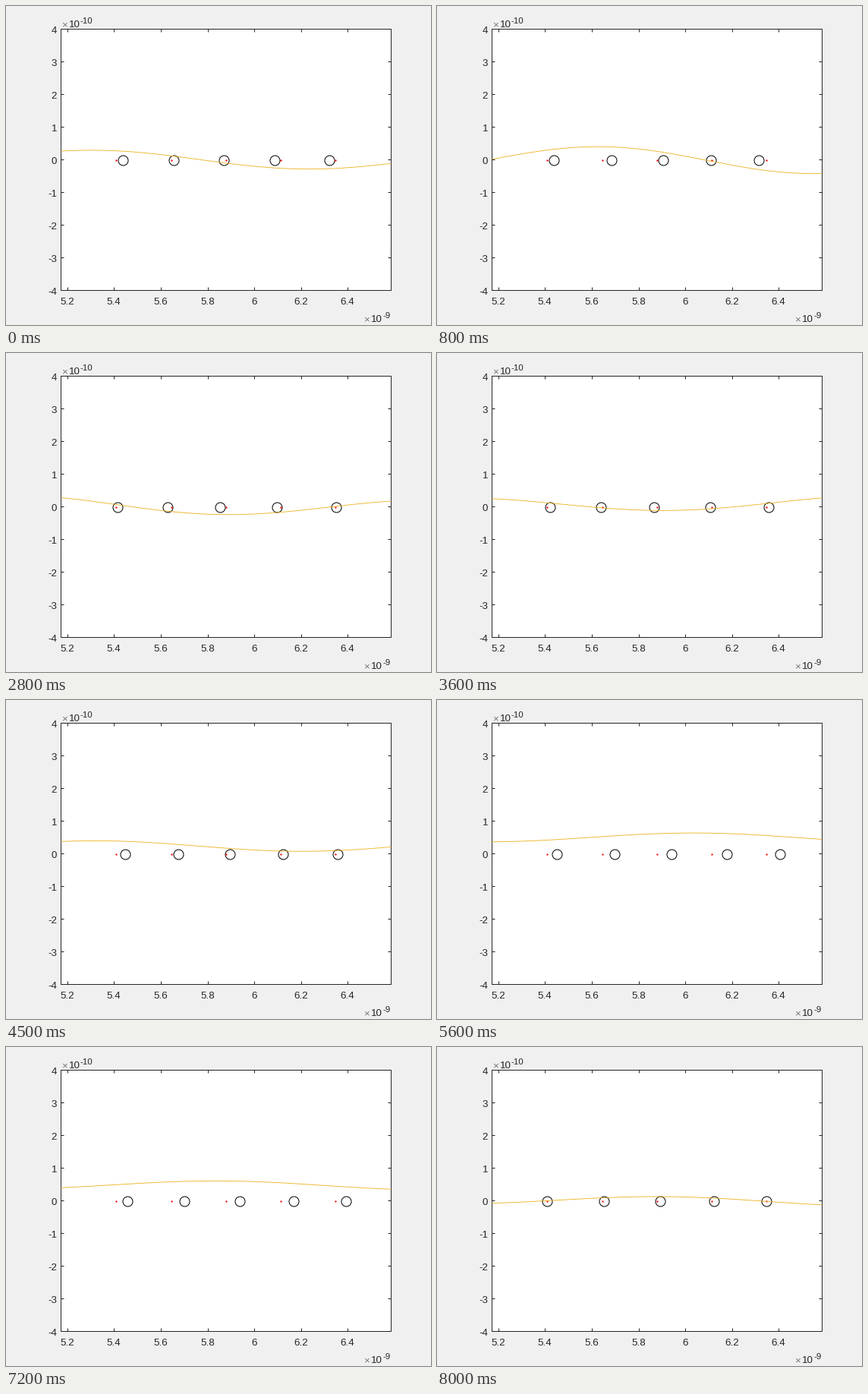
A matplotlib script for the animation above (8.1 s loop, 560 px wide and 420 px high).

```python
import numpy as np
import matplotlib.pyplot as plt
from matplotlib.animation import FuncAnimation
from matplotlib.patches import Rectangle

WIDTH, HEIGHT, DPI = 560, 420, 100
FRAMES, INTERVAL = 81, 100
PX = 72 / DPI  # points per pixel
LEFT, RIGHT, TOP, BOTTOM = 72, 507, 30, 374
MIDDLE, UNIT_Y = 202, 43
ZERO_Y = MIDDLE + 0.5  # centre of the pixel row
TICK = 4.4
INK = "#262626"
CENTRE, SPACING = 289.8, 72.3
SHIFT = 0.7155  # horizontal pixels per vertical pixel of displacement
WAVENUMBER = 0.816  # radians per lattice spacing

fig = plt.figure(figsize=(WIDTH / DPI, HEIGHT / DPI), dpi=DPI, facecolor="#f0f0f0")
ax = fig.add_axes([0, 0, 1, 1])
ax.set(xlim=(0, WIDTH), ylim=(HEIGHT, 0))
ax.axis("off")


def label(x, y, text, ha="left", size=13.33, color=INK):
    ax.text(x, y, text, ha=ha, va="baseline", color=color,
            family="Liberation Sans", size=size * PX)


def segment(x0, y0, x1, y1):
    ax.plot([x0, x1], [y0, y1], color=INK, lw=PX, solid_capstyle="butt", zorder=2)


def exponent(x, y, power):
    label(x, y, "×", color="#777777")
    label(x + 9.5, y, "10")
    label(x + 24.5, y - 5, power, size=11.5)


def draw_axes():
    ax.add_patch(Rectangle((LEFT, TOP), RIGHT - LEFT, BOTTOM - TOP,
                           fc="white", ec=INK, lw=PX, zorder=1))
    for i in range(7):
        x = np.floor(81.4 + 61.54 * i)
        segment(x, BOTTOM, x, BOTTOM - TICK)
        segment(x, TOP, x, TOP + TICK)
        label(x, 393, f"{5.2 + 0.2 * i:.2g}", ha="center")
    for value in range(-4, 5):
        y = MIDDLE - UNIT_Y * value
        segment(LEFT, y, LEFT + TICK, y)
        segment(RIGHT, y, RIGHT - TICK, y)
        label(67, y + 6, str(value), ha="right")
    exponent(73, 28, "-10")
    exponent(471.5, 416, "-9")


def drift(t):
    """Common offset: a slow quadratic rise, then a quick fall."""
    if t < 63:
        return 30.5 * (max(t - 20, 0) / 43) ** 2
    return 30.5 * np.cos(np.pi / 2 * (t - 63) / 17)


def tilt(t):
    """Slope of the long wave, with one surge near the peak of the drift."""
    return 0.9 * np.cos(2 * np.pi * (t - 64) / 24) + 1.6 * np.exp(-((t - 64) / 6) ** 2)


def amplitude(t):
    return 5.5 + 12 * np.exp(-(t / 33) ** 2) - 6 * np.exp(-t)


def phase(t):
    """Steady travel to the right, ahead of pace until the drift peaks."""
    lead = 68 * np.tanh(t / 8) * (1 + np.tanh((60 - t) / 3)) / 2
    return np.radians(46.46 * t - 112 + lead)


def displacement(x, t):
    s = (x - CENTRE) / SPACING
    return drift(t) + tilt(t) * s + amplitude(t) * np.cos(WAVENUMBER * s - phase(t))


draw_axes()
sites = CENTRE + SPACING * np.arange(-2, 3)
curve_x = np.linspace(LEFT + 0.5, RIGHT + 0.5, 200)
level = np.full(5, ZERO_Y)
atoms, = ax.plot(sites, level, "o", mfc="none", mec="black", ms=13 * PX, mew=PX, zorder=3)
ax.plot(sites, level, "o", color="red", ms=2.3 * PX, mew=0, zorder=4)
curve, = ax.plot([], [], color="#edb120", lw=0.85 * PX, solid_capstyle="butt", zorder=5)


def update(frame):
    atoms.set_xdata(sites + SHIFT * displacement(sites, frame))
    curve.set_data(curve_x, ZERO_Y - displacement(curve_x, frame))
    return atoms, curve


animation = FuncAnimation(fig, update, frames=FRAMES, interval=INTERVAL,
                          repeat=True, repeat_delay=0)
plt.show()
```
